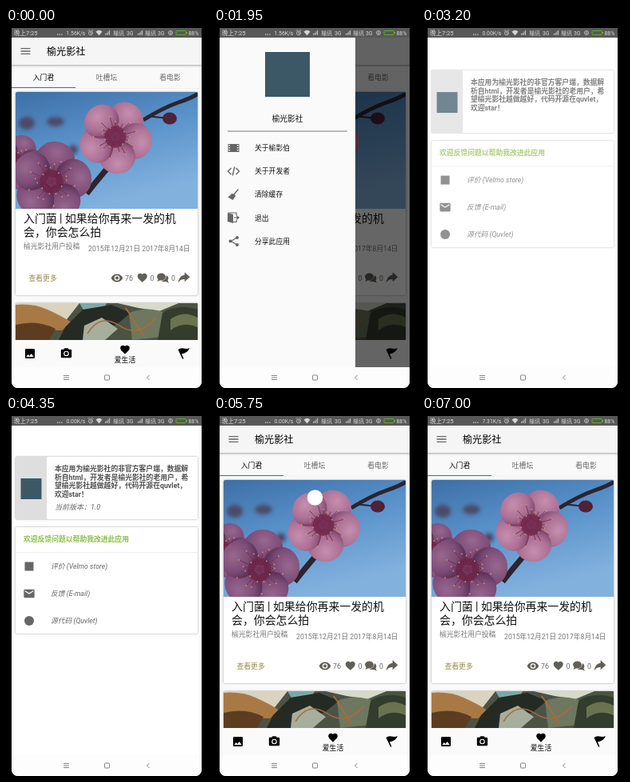
These frames come from a looping animation (253x450 px, 7050 ms). An HTML page:

```html
<!DOCTYPE html>
<html lang="zh-CN">
<head>
<meta charset="utf-8">
<title>榆光影社</title>
<style>
html, body { margin: 0; width: 100%; height: 100%; overflow: hidden; background: #000; }
svg { display: block; width: 100%; height: 100%; }
text { font-family: Roboto, "Noto Sans CJK SC", "Noto Sans CJK", sans-serif; font-size: 8.8px; white-space: pre; }
.mid { text-anchor: middle; }
.status text { font-size: 6.8px; fill: #d8d8d8; }
.heading { font-size: 13.9px; fill: #111; }
.meta { fill: #777; }
.count { font-size: 9.6px; fill: #666; }
.menu text { fill: #111; font-weight: 500; }
.bold { font-size: 8.7px; font-weight: 700; fill: #505050; }
.slant { font-size: 9px; font-style: italic; fill: #666; }
.card { fill: #fff; filter: drop-shadow(0 .7px .8px #0006); }
.line { fill: none; stroke: currentColor; }
</style>
</head>
<body>
<svg viewBox="0 0 253 450">
<defs>
  <clipPath id="screen"><path d="M7 0H245V442a8 8 0 0 1-8 8H15a8 8 0 0 1-8-8z"/></clipPath>
  <clipPath id="photo"><path d="M12 82a2 2 0 0 1 2-2H238a2 2 0 0 1 2 2V226H12z"/></clipPath>
  <clipPath id="photo2"><path d="M12 344H240V390H12z"/></clipPath>
  <filter id="soft"><feGaussianBlur stdDeviation="2.5"/></filter>
  <linearGradient id="sky" x2=".4" y2="1"><stop stop-color="#3d6fa6"/><stop offset=".5" stop-color="#5a93cb"/><stop offset="1" stop-color="#83b1de"/></linearGradient>
  <linearGradient id="shade" x2="0" y2="1"><stop stop-color="#0004"/><stop offset="1" stop-color="#0000"/></linearGradient>
  <radialGradient id="petal" cy=".3" r=".7"><stop stop-color="#c68fae"/><stop offset=".6" stop-color="#ab6f94"/><stop offset="1" stop-color="#7b4468"/></radialGradient>
  <radialGradient id="petal2" cy=".3" r=".7"><stop stop-color="#97688f"/><stop offset=".6" stop-color="#7d4c77"/><stop offset="1" stop-color="#522c50"/></radialGradient>
  <symbol id="bars" viewBox="0 0 24 24"><path d="M3 18h18v-2H3zM3 13h18v-2H3zM3 8h18V6H3z"/></symbol>
  <symbol id="heart" viewBox="0 0 24 24"><path d="M12 21.3l-1.5-1.3C5.4 15.4 2 12.3 2 8.5 2 5.4 4.4 3 7.5 3c1.7 0 3.4.8 4.5 2.1C13.1 3.8 14.8 3 16.5 3 19.6 3 22 5.4 22 8.5c0 3.8-3.4 6.9-8.5 11.5z"/></symbol>
  <symbol id="eye" viewBox="0 0 24 24"><path fill-rule="evenodd" d="M12 4.5C7 4.5 2.7 7.6 1 12c1.7 4.4 6 7.5 11 7.5s9.3-3.1 11-7.5c-1.7-4.4-6-7.5-11-7.5zM12 17a5 5 0 1 1 0-10 5 5 0 0 1 0 10zm0-8a3 3 0 1 0 0 6 3 3 0 0 0 0-6z"/></symbol>
  <symbol id="image" viewBox="0 0 24 24"><path fill-rule="evenodd" d="M21 19V5a2 2 0 0 0-2-2H5a2 2 0 0 0-2 2v14a2 2 0 0 0 2 2h14a2 2 0 0 0 2-2zM8.5 13.5l2.5 3 3.5-4.5 4.5 6H5z"/></symbol>
  <symbol id="camera" viewBox="0 0 24 24"><path fill-rule="evenodd" d="M9 2L7.2 4H4a2 2 0 0 0-2 2v12a2 2 0 0 0 2 2h16a2 2 0 0 0 2-2V6a2 2 0 0 0-2-2h-3.2L15 2zM12 17a5 5 0 1 1 0-10 5 5 0 0 1 0 10z"/><circle cx="12" cy="12" r="3.2"/></symbol>
  <symbol id="mail" viewBox="0 0 24 24"><path fill-rule="evenodd" d="M20 4H4a2 2 0 0 0-2 2v12a2 2 0 0 0 2 2h16a2 2 0 0 0 2-2V6a2 2 0 0 0-2-2zm0 4l-8 5-8-5V6l8 5 8-5z"/></symbol>
  <symbol id="forward" viewBox="0 0 24 24"><path d="M13 2l10 9-10 9v-5C7 15 3.5 17 1 22 1.8 14 5.5 8 13 7z"/></symbol>
  <symbol id="signal" viewBox="0 0 8 8"><path d="M0 7h1V5H0zM2 7h1V4H2zM4 7h1V2H4zM6 7h1V0H6z"/></symbol>
</defs>
<rect width="253" height="450"/>
<g clip-path="url(#screen)">
  <!-- home -->
  <rect x="7" width="238" height="450" fill="#f9f9f9"/>
  <rect x="7" y="12" width="238" height="34" fill="#f5f5f5"/>
  <rect x="7" y="46" width="238" height="3" fill="url(#shade)"/>
  <use href="#bars" x="16.500" y="21" width="16" height="16" fill="#666"/>
  <text x="51" y="34" style="font-size:12.1px">榆光影社</text>
  <g class="mid">
    <text x="47" y="64.500">入门君</text>
    <text x="126" y="64.500" fill="#666">吐槽坛</text>
    <text x="205.500" y="64.500" fill="#666">看电影</text>
  </g>
  <path d="M7 75.500H245" stroke="#eee" stroke-width=".8"/>
  <rect x="7" y="74" width="80" height="1" fill="#2b7f9c"/>

  <rect class="card" x="12" y="80" width="228" height="254" rx="2"/>
  <g clip-path="url(#photo)">
    <rect x="12" y="80" width="228" height="146" fill="url(#sky)"/>
    <g fill="#4b4a68" filter="url(#soft)">
      <ellipse cx="26" cy="119" rx="10" ry="8"/><ellipse cx="62" cy="117" rx="11" ry="6"/><circle cx="84" cy="152" r="6"/>
    </g>
    <g class="line" color="#2c2430">
      <path stroke-width="7" d="M101 207Q122 180 148 152"/>
      <path stroke-width="5" d="M172 115Q196 100 216 93T242 81"/>
      <path stroke-width="2" d="M176 110L204 113"/>
    </g>
    <ellipse cx="205" cy="113" rx="9" ry="7.500" fill="#4f2236"/>
    <g id="flowers"></g>
  </g>
  <text class="heading" x="22" y="243">入门菌 | 如果给你再来一发的机</text>
  <text class="heading" x="22" y="260">会，你会怎么拍</text>
  <text class="meta" x="22" y="275.500">榆光影社用户投稿</text>
  <text class="meta" x="103" y="278.500" style="font-size:8.700px">2015年12月21日 2017年8月14日</text>
  <text x="28.500" y="315.500" fill="#8d8848">查看更多</text>
  <g fill="#625f58">
    <use href="#eye" x="131" y="304.500" width="16" height="16"/>
    <use href="#heart" x="163.500" y="305" width="14.500" height="14.500"/>
    <path d="M189 311a5.500 4.500 0 1 1 5.500 4.500l-2 0-3 1.500 1-2.500z"/>
    <path d="M201 309q4 3 1.500 6.500l1.500 3-4-1.500q-4 .5-5.500-1 6-.5 6.500-7z"/>
    <use href="#forward" x="215" y="304" width="16" height="16"/>
  </g>
  <g class="count"><text x="149" y="316">76</text><text x="180.500" y="316">0</text><text x="207" y="316">0</text></g>

  <rect class="card" x="12" y="344" width="228" height="60" rx="2"/>
  <g clip-path="url(#photo2)">
    <path fill="#4c5344" d="M12 344H240V390H12z"/>
    <path fill="#d9d3c0" d="M12 344H92L70 372 12 366z"/>
    <path fill="#a87945" d="M12 346Q34 344 52 352T82 368L70 378 12 376z"/>
    <path fill="#5c3d22" d="M12 371Q40 364 62 376L54 390H12z"/>
    <path fill="#7ca9a8" d="M92 344h34l-4 8-24 2z"/>
    <path fill="#252a25" d="M74 374L96 352 132 346 156 356 142 368 100 390H66z"/>
    <path fill="#a7ae9c" d="M98 372l22-10 20 14-16 14H96z"/>
    <path fill="#d7d9c9" d="M140 344H216L192 354 166 350z"/>
    <path fill="#6f775f" d="M154 356Q180 346 204 358L196 386 158 390z"/>
    <path class="line" color="#ad6b38" stroke-width="1.500" d="M102 382Q118 356 142 372T188 362M150 350L172 384"/>
    <path fill="#343c2d" d="M196 356Q216 344 240 352V390H190z"/>
    <path fill="#69734f" d="M206 364Q222 352 240 362V374Q222 366 206 378z"/>
  </g>

  <rect x="7" y="390" width="238" height="34" fill="#fafafa"/>
  <use href="#image" x="22" y="399" width="16" height="16"/>
  <use href="#camera" x="67.500" y="399" width="16" height="16"/>
  <use href="#heart" x="142" y="395" width="14" height="14"/>
  <text class="mid" x="149" y="417.500">爱生活</text>
  <path d="M215.500 402q3-2.500 7-1.500t7.500-.5q-2.500 6-10 7.500l2.500 5.800-1.400.5z"/>
  <g id="spinner">
    <circle r="13" fill="#fff" style="filter:drop-shadow(0 .6px .7px #0005)"/>
    <circle id="arc" class="line" r="6" color="#333" stroke-width="1.700"/>
  </g>

  <!-- drawer -->
  <rect id="scrim" x="7" y="12" width="238" height="412"/>
  <g id="drawer" class="menu">
    <rect x="7" y="12" width="170" height="412" fill="#fafafa"/>
    <rect x="64" y="30" width="56" height="56" fill="#3c5866"/>
    <text class="mid" x="92" y="117" style="font-size:9.700px">榆光影社</text>
    <path d="M17 129H167" stroke="#777"/>
    <g id="items"></g>
    <g fill="#666" color="#666">
      <path fill-rule="evenodd" d="M17.500 145h14v10h-14zm1 1v1.500h1.500v-1.500zm0 3v1.500h1.500v-1.500zm0 3v1.500h1.500v-1.500zm10.500-6v1.500h1.500v-1.500zm0 3v1.500h1.500v-1.500zm0 3v1.500h1.500v-1.500z"/>
      <path class="line" stroke-width="1.400" d="M21.500 175l-4 4 4 4M27.500 175l4 4-4 4M25.800 173.500l-2.600 11"/>
      <path d="M30 201l1 1-5 6 1 2-3.500 5-6-3.500 5-4.500 2 .5z"/>
      <path d="M17 231l7 2v11l-7-2z"/>
      <path class="line" stroke-width="1.200" d="M18 231h10v3.500M28 239.500v3h-4M25 237h5"/>
      <path d="M28.500 234l3.500 3-3.500 3z"/>
      <path class="line" stroke-width="1.200" d="M29 262l-8 4.500 8 4.500"/>
      <circle cx="29" cy="262" r="2"/><circle cx="20.500" cy="266.500" r="2"/><circle cx="29" cy="271" r="2"/>
    </g>
  </g>

  <!-- about -->
  <g id="about">
    <rect x="7" y="12" width="238" height="412" fill="#fff"/>
    <g id="cards">
      <rect class="card" x="12" y="51" width="228" height="78" rx="1"/>
      <rect x="12" y="51" width="39" height="78" fill="#dedede"/>
      <rect x="18.500" y="78" width="26" height="26" fill="#3c5866"/>
      <g class="bold">
        <text x="61" y="69">本应用为榆光影社的非官方客户端，数据解</text>
        <text x="61" y="79.600">析自html，开发者是榆光影社的老用户，希</text>
        <text x="61" y="90.200">望榆光影社越做越好，代码开源在quvlet，</text>
        <text x="61" y="100.800">欢迎star！</text>
      </g>
      <text id="version" class="slant" x="61" y="117.300">当前版本：1.0</text>
      <rect class="card" x="12" y="139" width="228" height="133" rx="1"/>
      <text class="bold" x="22" y="157" style="font-size:8.800px;fill:#8bbf4a">欢迎反馈问题以帮助我改进此应用</text>
      <path d="M12 170.500H240" stroke="#eee"/>
      <g fill="#666">
        <rect x="23.500" y="182.500" width="11" height="11"/>
        <use href="#mail" x="21" y="214" width="16" height="16"/>
        <circle cx="29" cy="256" r="6"/>
      </g>
      <g class="slant">
        <text x="56" y="191">评价 (Velmo store)</text>
        <text x="56" y="225">反馈 (E-mail)</text>
        <text x="56" y="259">源代码 (Quvlet)</text>
      </g>
    </g>
  </g>

  <!-- system bars -->
  <rect x="7" width="238" height="12" fill="#585858"/>
  <g class="status" fill="#d4d4d4" color="#d4d4d4">
    <text x="10" y="8.800" style="font-size:7.500px">晚上7:25</text>
    <path d="M64 7.500h1.300v1.300h-1.300zM66.600 7.500h1.300v1.300h-1.300zM69.200 7.500h1.300v1.300h-1.300z"/>
    <text id="speed" x="75.500" y="8.800"></text>
    <circle class="line" cx="106" cy="6.300" r="2.500" stroke-width=".8"/>
    <path class="line" stroke-width=".8" d="M106 4.800v1.700h1.500M103 3.500l1.500-1.500M109 3.500l-1.500-1.500"/>
    <path d="M112.500 4.500q4-3.500 8 0l-4 5z"/>
    <use href="#signal" x="124" y="2.500" width="7" height="7"/>
    <text x="134.500" y="8.800">榆讯</text><text x="151" y="8.800">3G</text>
    <use href="#signal" x="165" y="2.500" width="7" height="7"/>
    <text x="174.500" y="8.800">榆讯</text><text x="190" y="8.800">3G</text>
    <circle class="line" cx="206" cy="6" r="2.500" stroke-width=".8"/><path d="M205.500 4.500h1v3h-1z"/>
    <rect class="line" x="213" y="3.500" width="12.500" height="5" rx="1" color="#62b52f" stroke-width=".9"/>
    <path d="M226 5h1v2h-1z" fill="#62b52f"/>
    <text x="228.500" y="8.800">88%</text>
  </g>
  <rect x="7" y="424" width="238" height="26" fill="#fdfdfd"/>
  <circle id="ripple" cx="177" cy="437" r="14" fill="#ececec"/>
  <g class="line" color="#777" stroke-width=".9">
    <path d="M72 434.500h7M72 437h7M72 439.500h7"/>
    <rect x="123.500" y="434" width="6" height="6" rx=".8"/>
    <path d="M179.500 434l-3 3 3 3"/>
  </g>
  <circle id="touch" cx="180" cy="441" r="7" fill="#f8f8f8" stroke="#bbb"/>
</g>
</svg>
<script>
const LOOP = 7050;
const $ = id => document.getElementById(id);
const clamp = v => Math.min(1, Math.max(0, v));
const span = (t, from, to) => clamp((t - from) / (to - from));
const easeOut = u => 1 - (1 - u) ** 3;
const move = (id, x, y, more = "") => $(id).setAttribute("transform", `translate(${x} ${y})${more}`);
const fade = (id, a) => $(id).setAttribute("opacity", a);

function flower(x, y, size, turn, fill) {
  let out = `<g transform="translate(${x} ${y}) rotate(${turn})">`;
  for (let a = 0; a < 360; a += 72)
    out += `<ellipse cy="${-size * .57}" rx="${size * .5}" ry="${size * .46}" fill="url(#${fill})" transform="rotate(${a})"/>`;
  out += `<circle r="${size * .3}" fill="#6b1f42" opacity=".7"/>`;
  for (let a = 0; a < 360; a += 15) {
    const r = size * (.45 + .17 * Math.sin(a));
    out += `<g transform="rotate(${a})"><path d="M0 0V${-r}" stroke="#7a2c50" stroke-width=".8"/><circle cy="${-r}" r=".9" fill="#c59a7a"/></g>`;
  }
  return out + "</g>";
}
$("flowers").innerHTML =
  flower(14, 168, 34, 20, "petal2") + flower(57, 192, 49, 10, "petal2") + flower(137, 136, 45, 30, "petal");
$("items").innerHTML = ["关于榆影伯", "关于开发者", "清除缓存", "退出", "分享此应用"]
  .map((label, i) => `<text x="51" y="${153.2 + i * 29.1}">${label}</text>`).join("");

function draw(t) {
  const open = easeOut(span(t, 1100, 1500)) - easeOut(span(t, 2600, 2900));
  move("drawer", -172 * (1 - open), 0);
  fade("scrim", .6 * open);

  const leave = span(t, 5450, 5700);
  fade("about", span(t, 2800, 3050) * (1 - leave));
  move("about", 0, 20 * leave ** 2);
  const enter = span(t, 2950, 3300);
  fade("cards", enter);
  move("cards", 0, 26 * (1 - enter) ** 2);
  fade("version", span(t, 3300, 3500));

  fade("ripple", t < 5350 ? 0 : 1 - span(t, 5400, 5600));
  fade("touch", t >= 5350 && t < 5450 ? 1 : 0);

  // refresh indicator grows, spins, then shrinks
  const size = span(t, 5600, 5800) - span(t, 6800, 6950);
  const spin = Math.max(0, t - 5800);
  const length = 16 + 13 * Math.sin(spin / 210 - 1.5);
  move("spinner", 126.5, 102, ` scale(${size}) rotate(${spin * .36})`);
  $("arc").setAttribute("stroke-dasharray", `${length} 40`);
  fade("arc", span(t, 5800, 5900));

  $("speed").textContent = (t < 2150 ? "1.56" : t < 6500 ? "0.00" : "7.31") + "K/s";
}

const start = performance.now();
function tick() {
  draw((performance.now() - start) % LOOP);
  requestAnimationFrame(tick);
}
tick();
</script>
</body>
</html>
```
